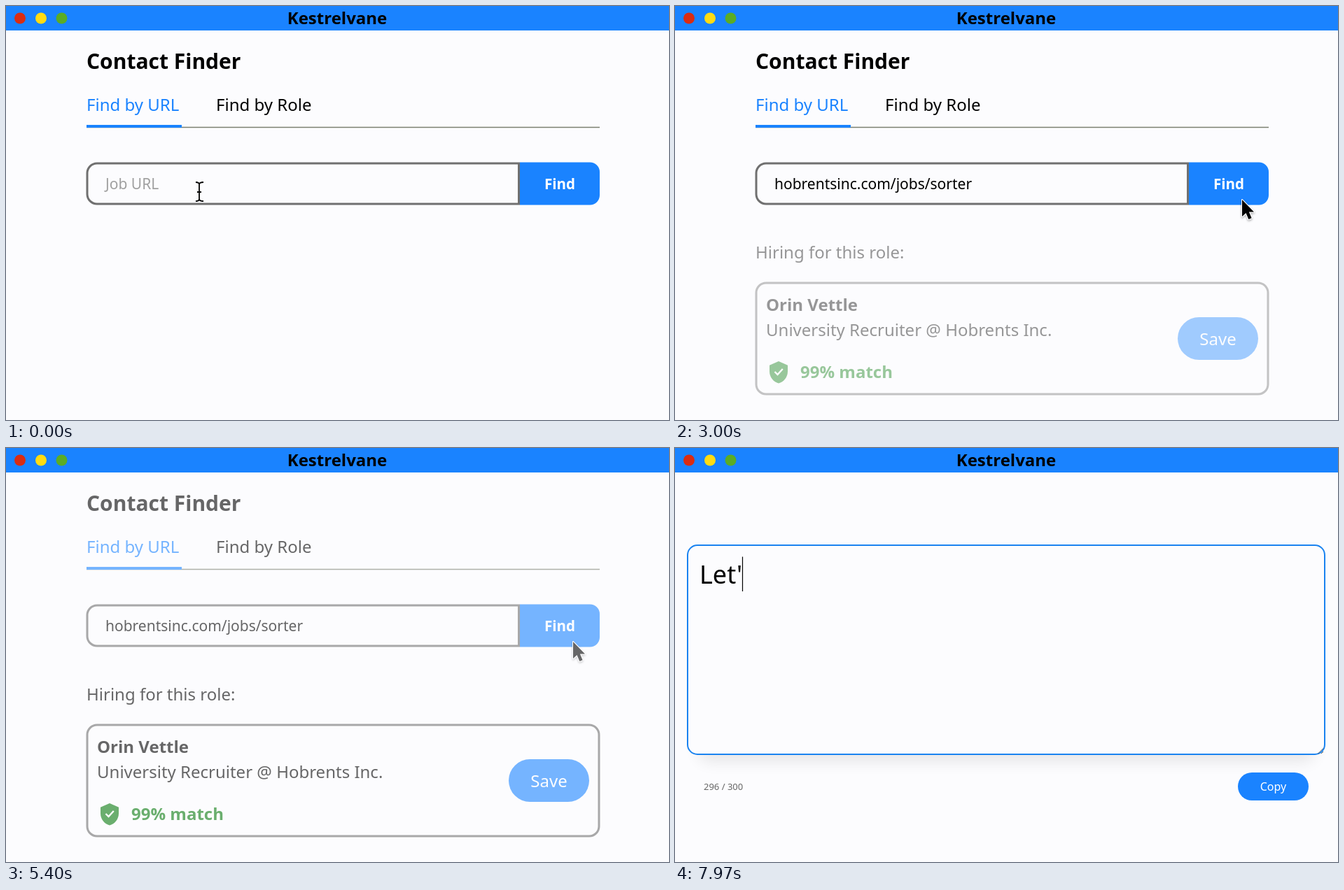
Recreate the animation shown at these times as an HTML page. Size 947 px wide and 592 px high, loop 8 s.

```html
<!DOCTYPE html>
<html lang="en">
<head>
<meta charset="utf-8">
<title>Contact Finder</title>
<style>
  html, body { margin: 0; width: 100%; height: 100%; overflow: hidden; background: #fcfcfe; }
  svg { display: block; width: 947px; height: 592px; }
  text { font: 500 24px "Noto Sans", "Open Sans", sans-serif; white-space: pre; }
  .heavy { font-weight: 800; }
  .mid { text-anchor: middle; }
  .white { fill: #fff; }
  .blue { fill: #1a83ff; }
  .frame { fill: none; stroke: #707070; stroke-width: 3; }
  .field { font-size: 21px; }
  .note { font-size: 36px; }
  .hint { fill: #a0a0a0; }
  .arrow { stroke: #fff; stroke-width: 2; paint-order: stroke; stroke-linejoin: round; }

  .timed { animation: 8s linear infinite; }
  #finder { animation-name: leave; }
  #composer { animation-name: enter; }
  #results { animation-name: results; }
  #pointer { animation-name: travel; animation-timing-function: ease-in-out; }
  #beam { animation-name: beam; animation-timing-function: step-end; }
  #arrow { animation-name: arrow; animation-timing-function: step-end; }
  #find { animation-name: idle; animation-timing-function: step-end; }
  #busy { animation-name: busy; animation-timing-function: step-end; }
  #arc { animation: spin 1s linear infinite; }

  @keyframes leave { 0%, 64.9% { opacity: 1 } 71.4%, 100% { opacity: 0 } }
  @keyframes enter { 0%, 71.5% { opacity: 0 } 80.9%, 100% { opacity: 1 } }
  @keyframes results { 0%, 35% { opacity: 0 } 41.2%, 100% { opacity: 1 } }
  @keyframes travel {
    0%, 11% { transform: translate(276px, 265px) }
    17.5% { transform: translate(818px, 285px) }
    19.5%, 100% { transform: translate(810px, 277px) }
  }
  @keyframes beam { 0% { opacity: 1 } 15.6%, 100% { opacity: 0 } }
  @keyframes arrow { 0% { opacity: 0 } 15.6%, 100% { opacity: 1 } }
  @keyframes idle { 0% { opacity: 1 } 20.06% { opacity: 0 } 35%, 100% { opacity: 1 } }
  @keyframes busy { 0% { opacity: 0 } 20.06% { opacity: 1 } 35%, 100% { opacity: 0 } }
  @keyframes spin { from { transform: rotate(-82.8deg) } to { transform: rotate(277.2deg) } }
</style>
</head>
<body>
<svg viewBox="0 0 947 592">
  <defs>
    <path id="pointerShape" d="M0 0V24L5.5 19L9.3 28L13.6 26.2L9.9 17.4H17Z"/>
    <filter id="blur" x="-10%" y="-20%" width="120%" height="150%"><feGaussianBlur stdDeviation="11"/></filter>
    <filter id="soft" x="-50%" y="-50%" width="200%" height="200%">
      <feDropShadow dx="0" dy="1.5" stdDeviation="1.5" flood-opacity=".35"/>
    </filter>
  </defs>
  <rect width="947" height="592" fill="#fcfcfe"/>

  <g id="finder" class="timed">
    <text class="heavy" x="115" y="90" style="font-size:30px">Contact Finder</text>
    <text class="blue" x="115" y="150">Find by URL</text>
    <text x="300" y="150">Find by Role</text>
    <path d="M115 173.5H848" stroke="#7b7f70" stroke-width="1.5"/>
    <path d="M115 172H251" stroke="#1a83ff" stroke-width="4"/>

    <path class="blue" d="M734 223.5h100a14 14 0 0 1 14 14v33a14 14 0 0 1-14 14H734Z"/>
    <path class="frame" d="M732.5 225H130a14 14 0 0 0-14 14v30a14 14 0 0 0 14 14H732.5Z"/>
    <text id="url" class="field" x="142" y="262"></text>
    <path id="urlCaret" d="M.5 241V270" stroke="#000"/>
    <text id="find" class="timed heavy white mid" x="791" y="262" style="font-size:20.6px">Find</text>
    <g id="busy" class="timed"><g transform="translate(790.5 254)">
      <path id="arc" d="M0 15.5A15.5 15.5 0 0 1-15.5 0" fill="none" stroke="#fff" stroke-width="5"/>
    </g></g>

    <g id="results" class="timed">
      <text x="115" y="361">Hiring for this role:</text>
      <rect class="frame" x="116" y="396" width="731" height="159" rx="14"/>
      <text class="heavy" x="130" y="436">Orin Vettle</text>
      <text x="130" y="471.5">University Recruiter @ Hobrents Inc.</text>
      <path d="M148 508L135 513.7V522.5C135 530.4 140.5 537.7 148 539.5C155.5 537.7 161 530.4 161 522.5V513.7Z" fill="#077a0c"/>
      <path d="M142.5 523L146.5 527L153.8 519" fill="none" stroke="#fff" stroke-width="2.4"/>
      <text class="heavy" x="179" y="532" fill="#077a0c">99% match</text>
      <rect class="blue" x="718" y="445" width="115" height="61" rx="30.5"/>
      <text class="white mid" x="775.5" y="485">Save</text>
    </g>

    <g id="pointer" class="timed">
      <path id="beam" class="timed" d="M-5-13q5 0 5 3V11q0 3-5 3M6-13q-6 0-6 3M0 11q0 3 6 3M-3 1H3" fill="none" stroke="#000" stroke-width="1.8"/>
      <g id="arrow" class="timed"><use class="arrow" href="#pointerShape" filter="url(#soft)"/></g>
    </g>
  </g>

  <g id="composer" class="timed">
    <rect x="34" y="170" width="879" height="278" rx="14" opacity=".09" filter="url(#blur)"/>
    <rect x="18" y="139" width="910" height="299" rx="14" fill="#fcfcfe" stroke="#1a83f0" stroke-width="2"/>
    <path d="M918.5 437L926 429.5M923 437L926 434" stroke="#555"/>
    <text id="note" class="note" x="35" y="194"></text>
    <path id="noteCaret" d="M.5 155.5V205" stroke="#000" stroke-width="1.2"/>
    <text id="counter" x="41" y="489" fill="#666" style="font-size:13px"></text>
    <rect class="blue" x="804" y="464" width="101" height="40" rx="20"/>
    <text class="white mid" x="854.5" y="490" style="font-size:16px">Copy</text>
    <g id="smallArrow" transform="translate(297 493) scale(.37)"><use class="arrow" href="#pointerShape"/></g>
  </g>

  <rect class="blue" width="947" height="35"/>
  <circle cx="20" cy="17.5" r="8" fill="#da2c12"/>
  <circle cx="50" cy="17.5" r="8" fill="#ffdc12"/>
  <circle cx="79.5" cy="17.5" r="8" fill="#5bac25"/>
  <text class="mid" x="473" y="26" style="font-weight:700">Kestrelvane</text>
</svg>
<script>
  const LOOP = 8000, LIMIT = 300;
  const address = "hobrentsinc.com/jobs/sorter", message = "Let'";
  const clickAt = 200, pasteAt = 600, submitAt = 1605;
  const focusAt = 5700, typeAt = 7480, keyGap = 130;
  const el = id => document.getElementById(id);
  const show = (node, on) => node.setAttribute("visibility", on ? "visible" : "hidden");
  const blink = since => since >= 0 && since % 1000 < 500;

  function setText(node, value, hint) {
    const content = value || hint;
    if (node.textContent !== content) node.textContent = content;
    node.classList.toggle("hint", !value);
  }

  function placeCaret(caret, node, value, x, on) {
    const width = value ? node.getComputedTextLength() : 0;
    caret.setAttribute("transform", `translate(${x + width} 0)`);
    show(caret, on);
  }

  function draw(t) {
    const link = t < pasteAt ? "" : address;
    setText(el("url"), link, "Job URL");
    const since = t < pasteAt ? t - clickAt : t - pasteAt;
    placeCaret(el("urlCaret"), el("url"), link, 142, t < submitAt && blink(since));

    const keys = t < typeAt ? 0 : Math.floor((t - typeAt) / keyGap) + 1;
    const typed = message.slice(0, keys);
    setText(el("note"), typed, "Type your invitation note here");
    placeCaret(el("noteCaret"), el("note"), typed, 35, typed !== "" || blink(t - focusAt));
    el("counter").textContent = `${LIMIT - typed.length} / ${LIMIT}`;
    show(el("smallArrow"), !typed);
  }

  function tick() {
    const clock = el("finder").getAnimations()[0];
    draw(((clock && clock.currentTime) ?? performance.now()) % LOOP);
    requestAnimationFrame(tick);
  }
  draw(0);
  requestAnimationFrame(tick);
</script>
</body>
</html>
```
